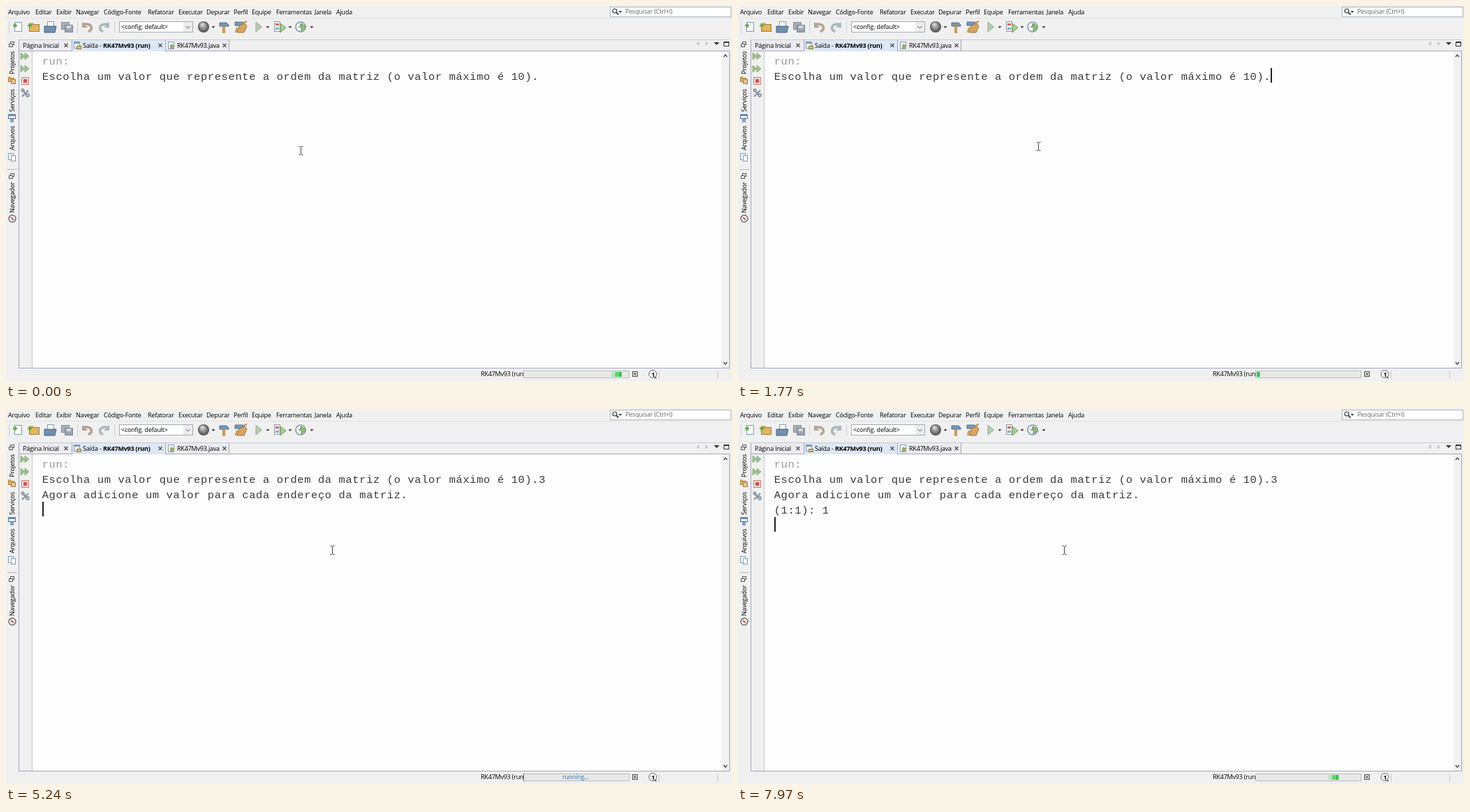
Recreate the animation shown at these times as an HTML page with a canvas. Size 1040x538 px, loop 8000 ms.

```html
<!DOCTYPE html>
<html lang="pt">
<head>
<meta charset="utf-8">
<title>Console</title>
<style>
  html, body { margin: 0; width: 100%; height: 100%; overflow: hidden; background: #f0f0f0; }
  canvas { display: block; }
</style>
</head>
<body>
<canvas id="stage" width="1040" height="538"></canvas>
<script>
const ctx = document.getElementById('stage').getContext('2d');
const LOOP = 8000, PITCH = 9.88, ROW = 22, LEFT = 52;
const PROJECT = 'RK47Mv93';
const EDGE = '#a3a9bf', GREEN = '#9cc08c', BLUE = '#7d9bbd', TAN = '#e3b45c', DARK = '#555';

function box(x, y, w, h, fill, stroke) {
  if (fill) { ctx.fillStyle = fill; ctx.fillRect(x, y, w, h); }
  if (stroke) { ctx.strokeStyle = stroke; ctx.lineWidth = 1; ctx.strokeRect(x + .5, y + .5, w - 1, h - 1); }
}
function path(d, fill, stroke, width = 1, x = 0, y = 0) {
  const p = new Path2D(d);
  ctx.save();
  ctx.translate(x, y);
  if (fill) { ctx.fillStyle = fill; ctx.fill(p); }
  if (stroke) { ctx.strokeStyle = stroke; ctx.lineWidth = width; ctx.stroke(p); }
  ctx.restore();
}
function disc(x, y, r, fill, stroke, width = 1) {
  ctx.beginPath();
  ctx.arc(x, y, r, 0, 7);
  if (fill) { ctx.fillStyle = fill; ctx.fill(); }
  if (stroke) { ctx.strokeStyle = stroke; ctx.lineWidth = width; ctx.stroke(); }
}
function label(str, x, y, color = '#000', weight = 400) {
  ctx.font = `${weight} 9px "Open Sans", "Noto Sans", sans-serif`;
  ctx.letterSpacing = '-0.2px';
  ctx.fillStyle = color;
  ctx.fillText(str, x, y);
}
function sideLabel(str, bottom) {
  ctx.save();
  ctx.translate(12, bottom);
  ctx.rotate(-Math.PI / 2);
  label(str, 0, 0);
  ctx.restore();
}
function line(row, str, color = '#3a3a3a') {
  ctx.font = '15.5px "Liberation Mono", monospace';
  ctx.letterSpacing = PITCH - 15.5 * .6 + 'px';
  ctx.fillStyle = color;
  ctx.fillText(str, LEFT - .3, 84 + row * ROW);
}
const down = (x, y, color = '#444') => path('M-2.5-1h5L0 2z', color, null, 1, x, y);
const cross = x => path('M-2.5-2.5l5 5M2.5-2.5l-5 5', null, '#444', 1.1, x, 56.5);
const page = (x, y, w, h) => box(x, y, w, h, '#fff', BLUE);
const folder = (x, y, w, h, color) => {
  box(x, y, w * .45, 3, color);
  box(x, y + 2, w, h - 2, color, '#a08048');
};
const plus = (x, y) => path('M-3 0h6M0-3v6', null, '#5fae45', 2.4, x, y);
const restore = y => {
  box(6, y - 4, 6, 5, '#f0f0f0', DARK);
  box(4, y - 1, 6, 5, '#fff', DARK);
};

function menuBar() {
  const items = { Arquivo: 3, Editar: 42, Exibir: 72, Navegar: 100, 'Código-Fonte': 140, Refatorar: 203,
    Executar: 247, Depurar: 287, Perfil: 326, Equipe: 352, Ferramentas: 387, Janela: 442, Ajuda: 473 };
  for (const name in items) label(name, items[name], 12);
  box(865, 1, 174, 15, '#fff', '#a9b5c6');
  disc(872, 7, 3, '#dce8f4', '#444', 1.2);
  path('M874 9l3.5 3.5', null, '#444', 1.8);
  down(880, 8);
  label('Pesquisar (Ctrl+I)', 887, 11, '#666');
}

function toolBar() {
  box(0, 17, 1040, 1, '#e3e3e3');
  for (const x of [4, 102, 155]) box(x, 22, 1, 17, '#d2d2d2');
  page(12, 23, 11, 14); plus(13, 28);
  folder(33, 24, 15, 13, TAN); plus(34, 28);
  page(59, 22, 10, 11);
  path('M55 29h17l-2 9h-15z', '#6f8fae', '#4b647d');
  box(79, 23, 12, 11, '#a9b0ba', '#858c98');
  box(84, 27, 12, 11, '#9ba4b0', '#7d8594');
  box(87, 28, 6, 4, '#d6dadf');
  path('M110 26h6q8 1 6 8l-4 3', null, '#b3a491', 3.5);
  path('M109 23v8h8z', '#b3a491');
  path('M147 26h-6q-8 1-6 8l4 3', null, '#a9b8b9', 3.5);
  path('M148 23v8h-8z', '#a9b8b9');

  box(162, 22, 106, 16, '#fff', '#a3adbb');
  label('<config. default>', 165, 33);
  box(254, 23, 13, 14, '#ececec');
  path('M257.5 29l3 3 3-3', null, DARK);
  const globe = ctx.createRadialGradient(281, 26, 1, 283, 30, 8);
  globe.addColorStop(0, '#d8d8d8');
  globe.addColorStop(1, '#484848');
  disc(283, 30, 8, globe);
  path('M306 24h10l3 3v2h-13z', '#7898b5', '#53718b');
  box(310, 29, 4, 10, '#c99a5a');
  path('M328 23h11l2 5h-13z', '#7898b5', '#53718b');
  path('M334 28l8-3 3 4-4 9h-10z', '#d9a45e', '#9a7440');
  path('M331 31l-2 7M340 24l5-2', null, '#c99a5a', 2.5);
  path('M358 23l8.5 7-8.5 7z', '#b7cbb0', '#94ad8d');
  box(384, 22, 9, 15, '#eef1f4', '#8f9aa8');
  box(386, 25, 5, 3, '#d36a62');
  box(386, 31, 5, 3, '#8faad0');
  path('M393 25l8 6-8 7z', '#a9cf92', '#6d9a59');
  disc(422, 30, 7, '#f7faf6', '#7f96a7', 1.6);
  path('M422 25v5h-3', null, '#555');
  path('M423 25l7 5-7 6z', '#8cc56f', '#62984b');
  for (const x of [297, 375, 407, 438]) down(x, 30);
}

function sideBar() {
  restore(55);
  sideLabel('Projetos', 98);
  folder(3, 101, 9, 8, TAN); box(7, 105, 7, 7, '#e6c58a', '#a08048');
  sideLabel('Serviços', 152);
  box(3, 155, 11, 7, '#fff', '#4e6a8f'); box(3, 155, 11, 3, '#6688b3'); box(6, 162, 5, 5, '#8ba3c2');
  sideLabel('Arquivos', 207);
  page(3, 211, 8, 10); page(7, 214, 7, 9);
  box(2, 234, 14, 1, '#b9b9b9');
  restore(244);
  sideLabel('Navegador', 297);
  disc(9, 305, 5, '#fff', '#666', 1.4);
  path('M6 302l4 2 2 4-4-2z', '#c45a50');
}

function tabs() {
  box(18, 48, 1019, 1, '#c6cad6');
  box(19, 49, 76, 15, '#ececf0');
  box(95, 49, 133, 16, '#dde8f6');
  box(229, 49, 91, 15, '#ececf0');
  for (const x of [18, 94, 228, 319]) box(x, 48, 1, 17, EDGE);
  label('Página Inicial', 24, 60);
  page(97, 51, 9, 10); box(97, 51, 9, 3, BLUE); box(101, 57, 7, 5, '#d8bd62', '#8f7d43');
  label('Saída - ', 110, 60);
  label(PROJECT + ' (run)', 139, 60, '#000', 700);
  page(232, 51, 9, 11); box(235, 56, 6, 5, '#c7a868'); path('M236 54l6 3-6 4z', '#83b36c');
  label(PROJECT + '.java', 245, 60);
  [86, 221, 313].forEach(cross);
  path('M993 51v6l-4-3z', '#c4c4c4');
  path('M1002 51v6l4-3z', '#c4c4c4');
  path('M1014 52h8l-4 4z', '#333');
  box(1028, 51, 8, 7, '#fff', '#333'); box(1028, 51, 8, 2, '#333');
}

function consolePane() {
  box(18, 64, 1019, 456, '#f0f0f0', EDGE);
  box(38, 65, 987, 454, '#fdfdfd');
  box(37, 65, 1, 454, '#c3c6cf');
  box(1025, 65, 11, 454, '#f1f1f1');
  path('M1028 73l2.5-3 2.5 3M1028 511l2.5 3 2.5-3', null, '#444', 1.3);
  for (const y of [72, 90]) path('M0-5l6 5-6 5zM6-5l6 5-6 5z', GREEN, '#82a874', .8, 21, y);
  box(22, 102, 11, 11, '#f5dcda', '#c9817c');
  box(25, 105, 5, 5, '#d4514c');
  path('M23 120l9 10M32 121l-9 9', null, '#8a939d', 2.2);
  disc(24, 121, 2.2, '#aab1b9', '#7b838d');
  disc(31, 128, 2.4, '#b7c2ce', '#687888');
}

function statusBar(t) {
  label(PROJECT + ' (run)', 680, 531);
  box(741, 523, 152, 11, '#e8e8e8', '#bcbcbc');
  if (t >= 3400 && t < 5265) {
    box(741, 523, 1, 11, '#4c6f9c');
    label('running...', 797, 531, '#2878b8');
  } else {
    const tick = t < 3400 ? t / 51 + 25.4 : (t - 6640) / 48 + 53.4;
    const head = 743 + Math.floor(tick) % 30 * 5.37;
    ctx.save();
    ctx.beginPath();
    ctx.rect(743, 525, 148, 7);
    ctx.clip();
    ['#35c552', '#5fd474', '#b5e8bd'].forEach((color, i) => box(head - i * 5, 525, 4.7, 7, color));
    ctx.restore();
  }
  box(897, 524, 8, 8, '#ddd', '#555');
  path('M899 526l4 4M903 526l-4 4', null, '#555');
  disc(926.5, 528, 5.5, '#fafafa', '#666');
  path('M928 533l4 2-1-4z', '#666');
  label('1', 924.5, 531.5, '#000', 700);
  box(935, 524, 1, 11, '#c8c8c8');
  box(1019, 524, 1, 11, '#c8c8c8');
}

// Each entry: start time, row, column; the caret blinks from there.
const carets = [[1500, 1, 72], [4500, 1, 73], [5240, 3, 0], [5272, 3, 7], [7400, 3, 8], [7960, 4, 0]];

function output(t) {
  line(0, 'run:', '#999');
  line(1, 'Escolha um valor que represente a ordem da matriz (o valor máximo é 10).' + (t >= 4500 ? '3' : ''));
  if (t >= 5240) line(2, 'Agora adicione um valor para cada endereço da matriz.');
  if (t >= 5272) line(3, '(1:1): ' + (t >= 7400 ? '1' : ''));
  const caret = carets.findLast(c => t >= c[0]);
  if (caret && (t - caret[0]) % 1000 < 500)
    box(Math.round(LEFT + caret[2] * PITCH), 67 + caret[1] * ROW, 2, 21, '#222');
}

const moves = [[1650, 422, 207], [1770, 430, 201], [2050, 460, 200], [2400, 468, 201], [2520, 467, 202]];

function pointer(t) {
  let [, x, y] = moves[0];
  for (let i = 1; i < moves.length; i++) {
    const [t0, x0, y0] = moves[i - 1], [t1, x1, y1] = moves[i];
    if (t < t0) break;
    const k = Math.min(1, (t - t0) / (t1 - t0));
    x = x0 + (x1 - x0) * k;
    y = y0 + (y1 - y0) * k;
  }
  path('M-2.5-5.5h2l1 1 1-1h2M.5-5v11M-2.5 6.5h2l1-1 1 1h2', null, '#444', 1, Math.round(x), Math.round(y));
}

function draw(now) {
  const t = now % LOOP;
  box(0, 0, 1040, 538, '#f0f0f0');
  menuBar();
  toolBar();
  sideBar();
  consolePane();
  tabs();
  output(t);
  statusBar(t);
  pointer(t);
  requestAnimationFrame(draw);
}
requestAnimationFrame(draw);
</script>
</body>
</html>
```
